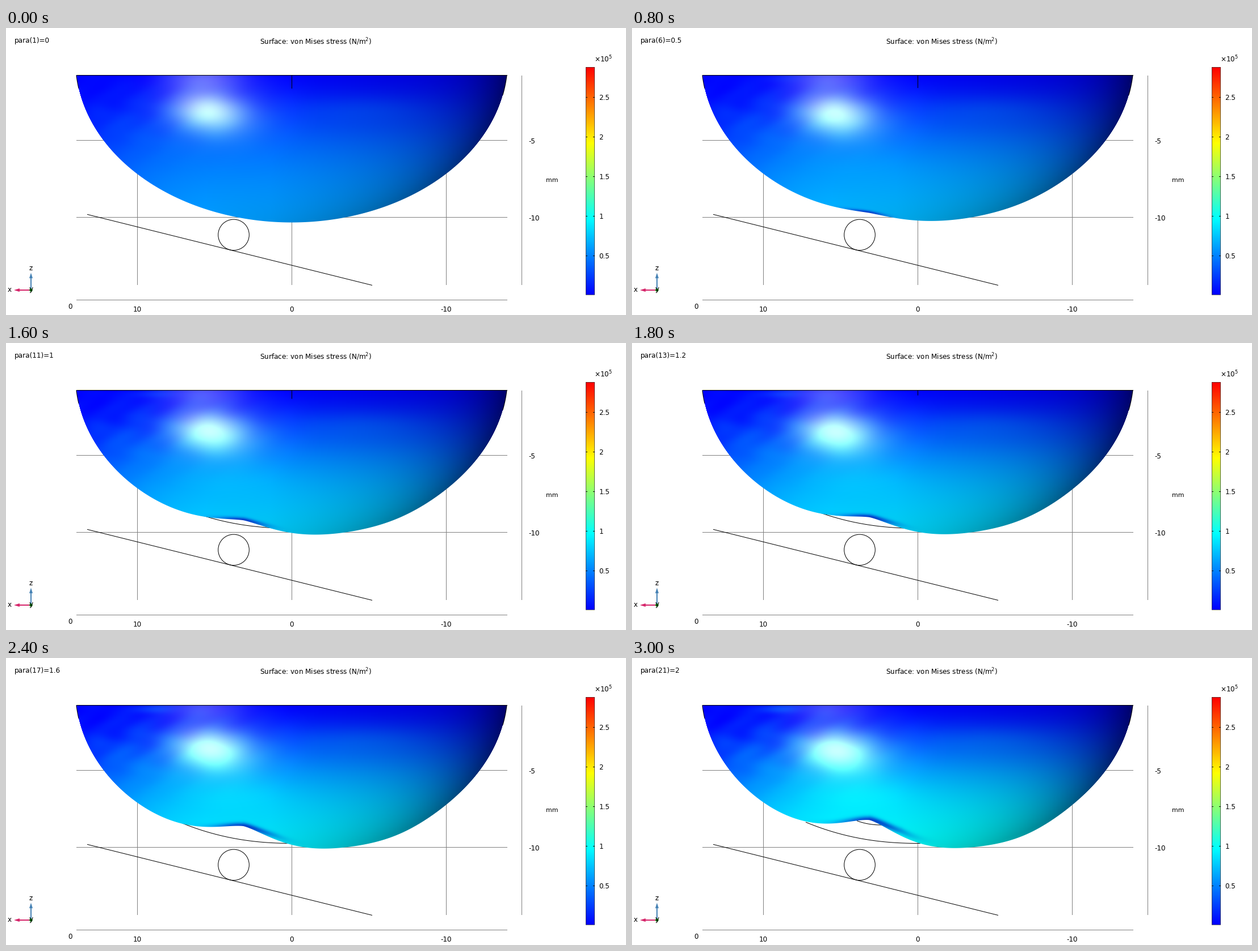
A matplotlib script that plays this animation: 1092 by 507 pixels, repeating every 3200 ms.

```python
import numpy as np
import matplotlib.pyplot as plt
from matplotlib.animation import FuncAnimation
from matplotlib.patches import Circle, Polygon

W, H, DPI = 1092, 507, 100
FRAMES, INTERVAL = 16, 200
PX = 72 / DPI
MM = 27.2

# bowl: ellipse centre, radii, and cropped drawing area
CX, CY, RX, RY = 503, 58, 380.6, 285.5
LEFT, RIGHT, TOP, BOTTOM = 120, 886, 84, 350

plt.rcParams['font.family'] = 'DejaVu Sans'
fig = plt.figure(figsize=(W / DPI, H / DPI), dpi=DPI, facecolor='white')
ax = fig.add_axes([0, 0, 1, 1])
ax.axis('off')


def bump(x, y, cx, cy, sx, sy):
    return np.exp(-((x - cx) / sx) ** 2 - ((y - cy) / sy) ** 2)


def label(x, y, s, size=12, ha='left'):
    return ax.text(x, y, s, fontsize=size * PX, ha=ha, va='baseline', zorder=6)


def line(xs, ys, color='black', width=1, z=1):
    return ax.plot(xs, ys, color=color, lw=width * PX, zorder=z, snap=False,
                   solid_capstyle='butt')[0]


def picture(data, x0, x1, y0, y1, z):
    return ax.imshow(data, extent=(x0, x1, y1, y0), zorder=z,
                     interpolation='nearest', aspect='auto')


# ---- bowl ----
cols = np.arange(LEFT, RIGHT) + .5
X, Y = np.meshgrid(cols, np.arange(TOP, BOTTOM) + .5)
NX, NY = (X - CX) / RX, (Y - CY) / RY
RIM = np.minimum(np.hypot(NX, NY), 1) ** 6
LIGHT = 1 - .2 * np.clip(NX + .1, 0, 1) - RIM * np.clip(.11 + .28 * NX, 0, 1)

PROFILE = 1 - np.exp(-((Y - TOP) / 130) ** 1.5)
MOTTLE = np.sin((X + 8 * np.sin(Y / 9)) / 14) * np.sin(Y / 11 + X / 40)
MOTTLE *= bump(X, Y, 230, 140, 190, 70)


def press(p):
    """How far the pin has pushed in, 0 to 1."""
    return max(0, p - .14) / 1.86


def rim_y(x, p):
    """Lower edge of the bowl under load p."""
    base = CY + RY * np.sqrt(np.clip(1 - ((x - CX) / RX) ** 2, 0, 1))
    d = x - 418
    dent = 50 * np.exp(-(np.abs(d) / np.where(d < 0, 94, 82)) ** 1.5)
    bulge = 7 * np.exp(-((x - 690) / 80) ** 2)
    return base + press(p) * (bulge - dent)


def bowl(p):
    k, push = p / 2, press(p)
    gap = rim_y(cols, p) - Y

    v = .02 + (.64 + .215 * p) * PROFILE * (1 - .7 * NX ** 4)
    v += .07 * bump(X, Y, 630, 142, 110, 22)
    v += k * (.1 * bump(X, Y, 400, 240, 90, 30)
              + .25 * bump(X, Y, 255, 90, 35, 8))
    v += (.03 + .04 * k) * MOTTLE

    # shaded hollow above the pin, drifting off the edge to the right
    drift = push * np.clip((X - 415) * .15, 0, 9)
    shade = np.exp(-((gap - drift) / (3 + 3 * push)) ** 2)
    shade *= np.exp(-((X - 412 - 10 * push) / (24 + 34 * push)) ** 2)
    shade *= min(1, push * 5) * .75
    v = np.clip(v * (1 - .85 * shade), 0, 2)
    light = LIGHT * (1 - .25 * shade)

    # highlight: core, soft halo and haze towards the top
    cx, cy = 354 + 4 * k, 146 + 17 * k
    shine = 145 * bump(X, Y - .1 * (X - cx), cx, cy, 60, 34)
    shine += 58 * bump(X, Y, cx + 18, cy + 2, 88, 52)
    shine += (80 - 22 * k) * bump(X, Y, 348, 86, 70, 26)

    rgb = np.clip(np.stack([v - 1, v, 2 - v], axis=-1), 0, 1)
    rgb = rgb * 255 * light[..., None] + shine[..., None]
    out = np.empty(X.shape + (4,), np.uint8)
    out[..., :3] = np.clip(rgb, 0, 255)
    inside = (cols > 123.5) & (cols < 882.5)
    out[..., 3] = np.clip(gap + .5, 0, 1) * inside * 255
    return out


surface = picture(bowl(0), LEFT, RIGHT, TOP, BOTTOM, 3)
line([124, 883], [83.5, 83.5], z=4)
for xs in (np.linspace(123.6, 128, 30), np.linspace(875, 882.4, 30)):
    line(xs, np.maximum(rim_y(xs, 0), TOP), z=4)
seam = line([503.5, 503.5], [TOP, 107], z=4)

# ---- grid and axis labels ----
GRAY = '#808080'
for x in (10, 0, -10):
    px = CX - MM * x
    line([px + .5] * 2, [84, 454], GRAY)
    label(px, 501, f'{x}', ha='center')
for z in (-5, -10):
    py = 62.5 - MM * z
    line([124, 883], [py, py], GRAY)
    label(920, py + 5.5, f'{z}')
line([124, 883], [480.5, 480.5], GRAY)
line([908.5, 908.5], [84, 454], GRAY)
label(112.5, 496, '0', ha='center')
label(951, 272, 'mm', 11)


# ---- ramp, pin and hidden contact edges ----
def arc(x0, y0, x1, y1):
    """Curve that levels out at its right end."""
    t = np.linspace(0, 1, 80)
    line(x0 + (x1 - x0) * t, y1 - (y1 - y0) * (1 - t) ** 2.25)


line([143, 645], [329.3, 454.5])
ax.add_patch(Circle((401, 365.4), 27.3, fill=False, ec='black', lw=PX))
arc(306, 290, 508, 327.5)
arc(396, 287.5, 441, 295)

# ---- colour legend ----
t = np.linspace(3, 0, 402)
rainbow = np.clip(np.stack([t - 1, np.minimum(t, 3 - t), 2 - t], -1), 0, 1)
picture(rainbow[:, None], 1021, 1037, 69, 471, 2)
line([1021.5, 1036.5, 1036.5, 1021.5, 1021.5],
     [69.5, 69.5, 471.5, 471.5, 69.5], '#303030', .7, 3)
for v in np.arange(.5, 3, .5):
    y = np.floor(472.9 - 140.2 * v) + .5
    line([1021, 1024], [y, y], z=4)
    line([1034, 1037], [y, y], z=4)
    label(1044.5, y + 4.5, f'{v:g}')
label(1036.5, 60, '×10$^5$')

# ---- orientation arrows ----
BLUE, PINK = '#4682b4', '#d6266b'
line([44, 44], [462, 440], BLUE, 2, 4)
line([44, 22], [463, 463], PINK, 2, 4)
for tip, c in (([(44, 432.5), (41, 442), (47, 442)], BLUE),
               ([(14, 463), (24, 460), (24, 466)], PINK)):
    ax.add_patch(Polygon(tip, fc=c, ec='none', zorder=5))
ax.add_patch(Circle((44, 463), 2.8, fc='#148c14', ec='none', zorder=5))
for x, y, s in ((44, 428, 'z'), (6.5, 466, 'x'), (44.5, 465, 'y')):
    label(x, y, s, ha='center')

label(546, 29, 'Surface: von Mises stress (N/m$^2$)', ha='center')
caption = label(15, 26, '')
ax.set_xlim(0, W)
ax.set_ylim(H, 0)


def update(i):
    step = i * 4 // 3
    p = step / 10
    caption.set_text(f'para({step + 1})={p:g}')
    surface.set_data(bowl(p))
    seam.set_ydata([TOP, TOP + 23 * max(0, 1 - (p / 1.4) ** 3)])
    return caption, surface, seam


anim = FuncAnimation(fig, update, frames=FRAMES, interval=INTERVAL,
                     repeat=True, repeat_delay=0)
plt.show()
```
